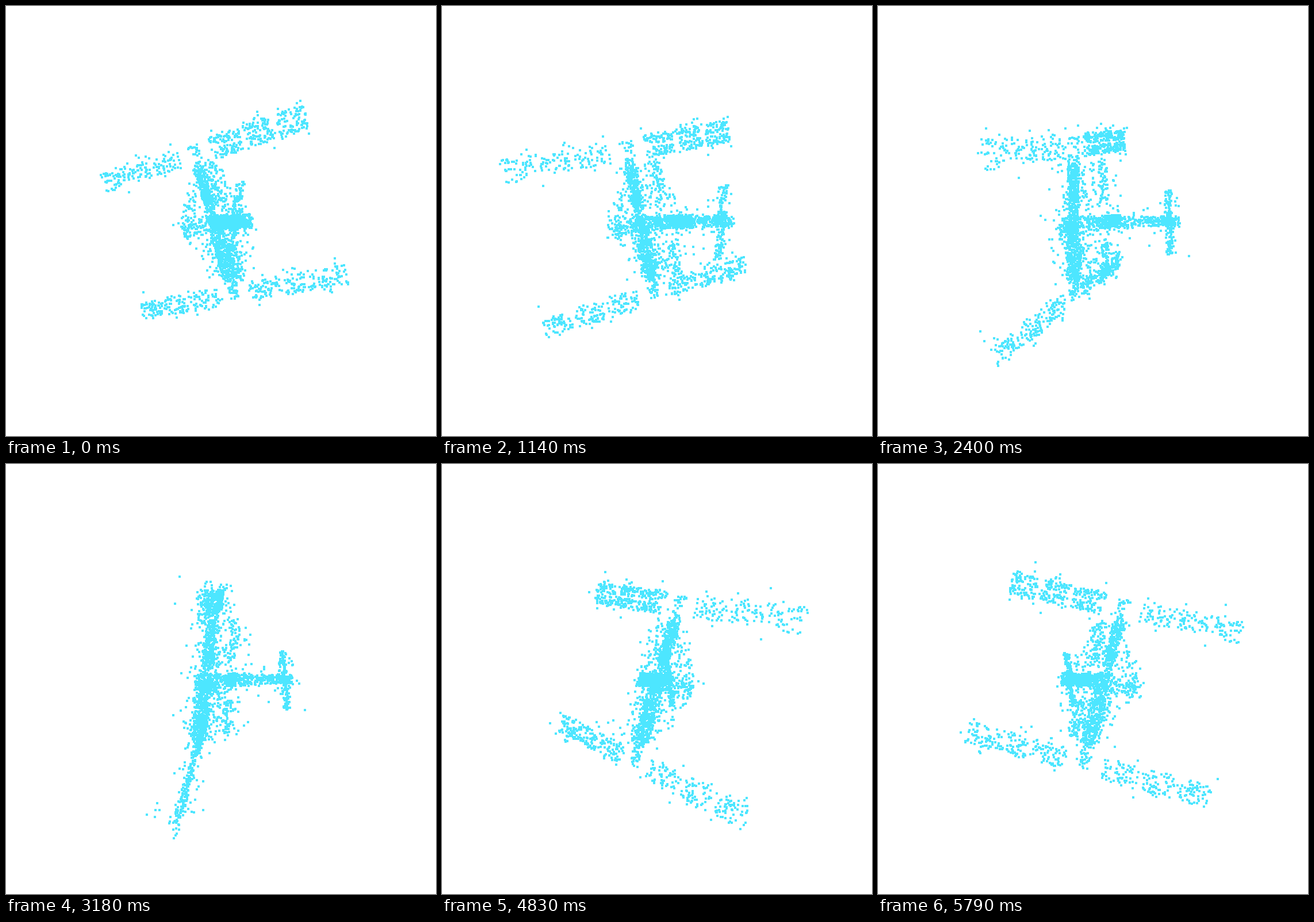
Recreate the animation shown at these times as a matplotlib script. Size 748 px wide and 748 px high, loop 5.82 s.

```python
import numpy as np
import matplotlib.pyplot as plt
from matplotlib.animation import FuncAnimation

SIZE, DPI = 748, 100
FRAMES, INTERVAL = 194, 30
CAMERA = 617          # camera distance; depth 0 is drawn at scale 1
CYAN = (0.3, 0.9, 1.0)

rng = np.random.default_rng(7)


def unit(v):
    v = np.array(v, float)
    return v / np.linalg.norm(v)


# Axes of the station: x right, y down, z towards the viewer
TRUSS = unit((72, 258, -16))
WING = unit((373, -95, 131))
BODY = unit((28, -4, 174))
SIDE = np.cross(BODY, TRUSS)
FACE = np.cross(TRUSS, WING)

TOP = np.array([-47, -122, -24])
BOTTOM = np.array([25, 136, -40])
FRONT = np.array([-8, 4, -42])


def rod(a, b, n, widths, axes, soft=0.1):
    """Points along a-b with box-shaped spread and a few strays."""
    a, b = np.array(a, float), np.array(b, float)
    pts = a + rng.uniform(0, 1, (n, 1)) * (b - a)
    stray = rng.uniform(0, 1, n) < soft
    for w, axis in zip(widths, axes):
        off = rng.uniform(-w, w, n)
        off = np.where(stray, off + rng.normal(0, 15, n), off)
        pts += off[:, None] * axis
    return pts


def wing(mid, sign, n, striped=False):
    """Half of a solar wing: three panels with narrow gaps."""
    parts = []
    for lo, hi in ((0.16, 0.44), (0.47, 0.73), (0.76, 1.0)):
        ends = [mid + sign * 203 * u * WING for u in (lo, hi)]
        if striped:
            for v in (-11.5, 11.5):
                a, b = (e + v * TRUSS for e in ends)
                parts.append(rod(a, b, n // 6, (9, 4), (TRUSS, FACE), 0.12))
        else:
            parts.append(rod(*ends, n // 3, (18, 4), (TRUSS, FACE), 0.2))
    return np.vstack(parts)


def along(lo, hi, n, w, soft=0.12):
    """Section of the truss between two fractions of its length."""
    a, b = (TOP + u * (BOTTOM - TOP) for u in (lo, hi))
    return rod(a, b, n, (w, w), (SIDE, BODY), soft)


def module(lo, hi, n, side, tall, soft=0.1):
    return rod(FRONT + lo * BODY, FRONT + hi * BODY, n,
               (side, tall), (SIDE, TRUSS), soft)


def build():
    cross = (SIDE, BODY)
    tall = (TRUSS, BODY)
    return np.vstack([
        wing(TOP, -1, 156),
        wing(TOP, 1, 324, striped=True),
        wing(BOTTOM, -1, 186),
        wing(BOTTOM, 1, 204),
        along(-0.06, 0.14, 45, 9),
        along(0.11, 0.34, 210, 9),
        along(0.30, 0.55, 130, 8),
        along(0.52, 0.66, 80, 11),
        along(0.62, 0.88, 260, 13, 0.2),
        along(0.86, 1.03, 45, 8),
        # pressurised modules
        module(-5, 52, 110, 12, 11),
        module(48, 98, 110, 10, 11),
        module(95, 180, 150, 7, 8),
        module(160, 192, 75, 9, 9),
        rod((2, 2, 20), (50, 0, 37), 260, (12, 9), tall, 0.12),
        rod(FRONT, FRONT + 66 * SIDE, 100, (12, 12), tall, 0.25),
        rod((-56, -50, -28), (-60, 16, -28), 45, (13, 11), cross, 0.3),
        # rear panels
        rod((27, -54, 128), (19, 0, 130), 75, (7, 6), cross),
        rod((19, 0, 130), (12, 56, 132), 80, (6, 6), cross),
        # radiators
        rod((-21, -102, 20), (-3, -35, 20), 65, (9, 7), cross, 0.25),
        rod((17, 38, 19), (32, 101, 19), 65, (9, 7), cross, 0.25),
        # loose points around the frame
        rod((-30, -90, -5), (-6, 0, -5), 65, (42, 36), cross, 0.3),
        rod((-4, 15, -10), (10, 95, -10), 75, (38, 34), cross, 0.3),
    ])


cloud = build()


def project(i):
    """Turn one degree per frame about the vertical axis."""
    a = np.radians(i)
    x, y, z = cloud.T
    px = x * np.cos(a) + z * np.sin(a)
    pz = z * np.cos(a) - x * np.sin(a)
    scale = CAMERA / (CAMERA - pz)
    return SIZE / 2 + px * scale, SIZE / 2 + y * scale


fig = plt.figure(figsize=(SIZE / DPI, SIZE / DPI), dpi=DPI, facecolor="white")
ax = fig.add_axes([0, 0, 1, 1])
ax.set_xlim(0, SIZE)
ax.set_ylim(SIZE, 0)
ax.axis("off")
dots, = ax.plot(*project(0), "s", color=CYAN, ms=3.5 * 72 / DPI,
                mew=0, snap=False)


def update(i):
    dots.set_data(*project(i))
    return dots,


anim = FuncAnimation(fig, update, frames=FRAMES, interval=INTERVAL,
                     repeat=True, repeat_delay=0)
plt.show()
```
